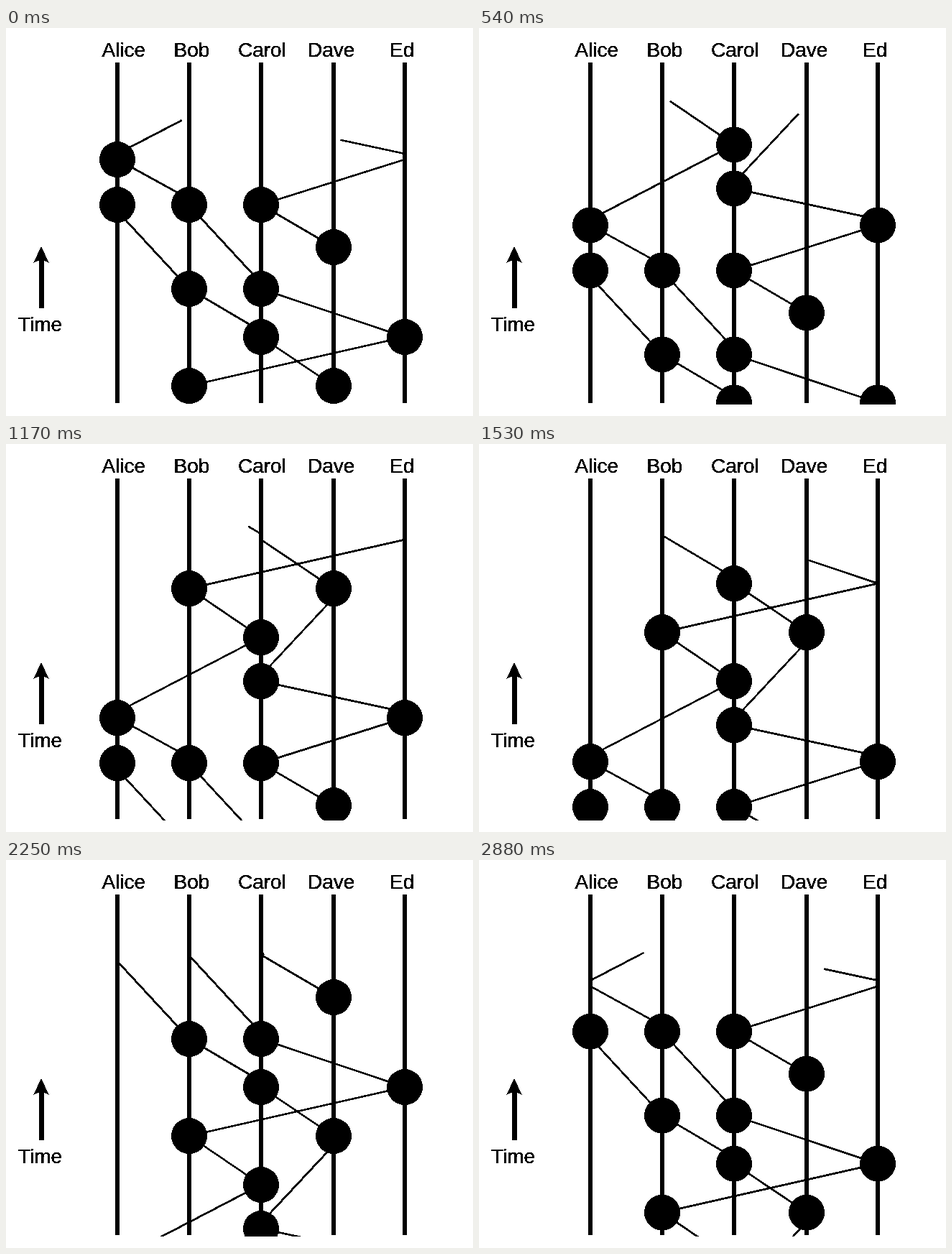
Write an HTML page with a canvas that moves like this. It is 650 px wide and 540 px high and loops after 2.91 s.

```html
<!DOCTYPE html>
<html lang="en">
<head>
<meta charset="utf-8">
<style>
html, body { margin: 0; width: 100%; height: 100%; overflow: hidden; background: #fff; }
canvas { display: block; filter: contrast(20); } /* hard, unsmoothed edges */
</style>
</head>
<body>
<canvas id="stage" width="650" height="540"></canvas>
<script>
const ctx = document.getElementById('stage').getContext('2d');
const STEP_MS = 30, STEPS = 97, SPEED = 5.08, PERIOD = 495;
const RADIUS = 25, LIFT = 8, MAX_RISE = 108, STAGGER = 5;

const people = [
  { name: 'Alice', lane: 155, textX: 133.5 },
  { name: 'Bob', lane: 255, textX: 233.5 },
  { name: 'Carol', lane: 355, textX: 323 },
  { name: 'Dave', lane: 456, textX: 420 },
  { name: 'Ed', lane: 555, textX: 534 }
];
const laneOf = initial => people.find(p => p.name[0] === initial).lane;

// Events share rows; "who" lists them in order of appearance from step "at".
const rows = [
  { y: 132, at: 7, who: 'C' },
  { y: 71, at: 14, who: 'C' },
  { y: 3, at: 25, who: 'BD' },
  { y: -65, at: 47, who: 'CE' },
  { y: -132, at: 70, who: 'BC' },
  { y: -190, at: 68, who: 'D' },
  { y: -249, at: 82, who: 'CBA' },
  { y: -312, at: 97, who: 'AE' }
];
const rowY = r => rows[r % rows.length].y - PERIOD * Math.floor(r / rows.length);

// Links by starting step: person and row, to person and row.
// "^" leaves a little above the centre of its event.
const schedule = {
  8: 'C1>B2 C0^D2',
  21.5: 'D2>C3 B2>E3',
  37: 'C3^B4',
  44.5: 'E3>C4',
  58.7: 'B4>A6',
  60: 'D5>C6',
  61: 'C4^B6',
  74.7: 'B6^A7 C6>E7',
  91: 'A7^C9 E7^C8'
};
const links = Object.entries(schedule).flatMap(([start, list]) =>
  list.split(' ').map(([from, row, mark, to, toRow]) => {
    const x1 = laneOf(from), x2 = laneOf(to);
    const y1 = rowY(+row) - (mark === '^' ? LIFT : 0);
    const y2 = Math.max(rowY(+toRow), y1 - MAX_RISE);
    const duration = 9 + 0.022 * Math.abs(x2 - x1);
    return { x1, y1, x2, y2, row: +row, start: +start, duration };
  }));

function label(text, x, y) {
  ctx.fillText(text, x, y);
  ctx.strokeText(text, x, y);
}

function drawScene() {
  ctx.fillStyle = '#fff';
  ctx.fillRect(0, 0, 650, 540);
  ctx.fillStyle = ctx.strokeStyle = '#000';
  ctx.font = '28px "Liberation Sans", Arial, sans-serif';
  ctx.lineWidth = 0.4;
  for (const { name, lane, textX } of people) {
    label(name, textX, 39.5);
    ctx.fillRect(lane - 3, 48, 6, 474);
  }
  label('Time', 17, 421.5);
  ctx.fillRect(46, 320, 7, 70);
  ctx.beginPath();
  ctx.moveTo(49, 304);
  ctx.lineTo(60, 327);
  ctx.lineTo(49, 322);
  ctx.lineTo(38, 327);
  ctx.fill();
}

// Draws the history from firstRow upwards at the given age, shifted down by dy.
function drawHistory(age, dy, firstRow) {
  ctx.lineWidth = 2.7;
  for (const { x1, y1, x2, y2, row, start, duration } of links) {
    const p = Math.min(1, (age - start) / duration);
    if (p <= 0 || row < firstRow) continue;
    ctx.beginPath();
    ctx.moveTo(x1, y1 + dy);
    ctx.lineTo(x1 + (x2 - x1) * p, y1 + (y2 - y1) * p + dy);
    ctx.stroke();
  }
  for (const { y, at, who } of rows.slice(firstRow)) {
    [...who].forEach((initial, i) => {
      if (age < at + i * STAGGER) return;
      ctx.beginPath();
      ctx.arc(laneOf(initial), y + dy, RADIUS, 0, Math.PI * 2);
      ctx.fill();
    });
  }
}

function frame() {
  const step = Math.floor(performance.now() / STEP_MS) % STEPS;
  const scroll = step * SPEED;
  drawScene();
  ctx.save();
  ctx.beginPath();
  ctx.rect(0, 0, 650, 524);
  ctx.clip();
  drawHistory(step, scroll, 0);
  drawHistory(step + STEPS, scroll + PERIOD, 2);
  ctx.restore();
  requestAnimationFrame(frame);
}
frame();
</script>
</body>
</html>
```
